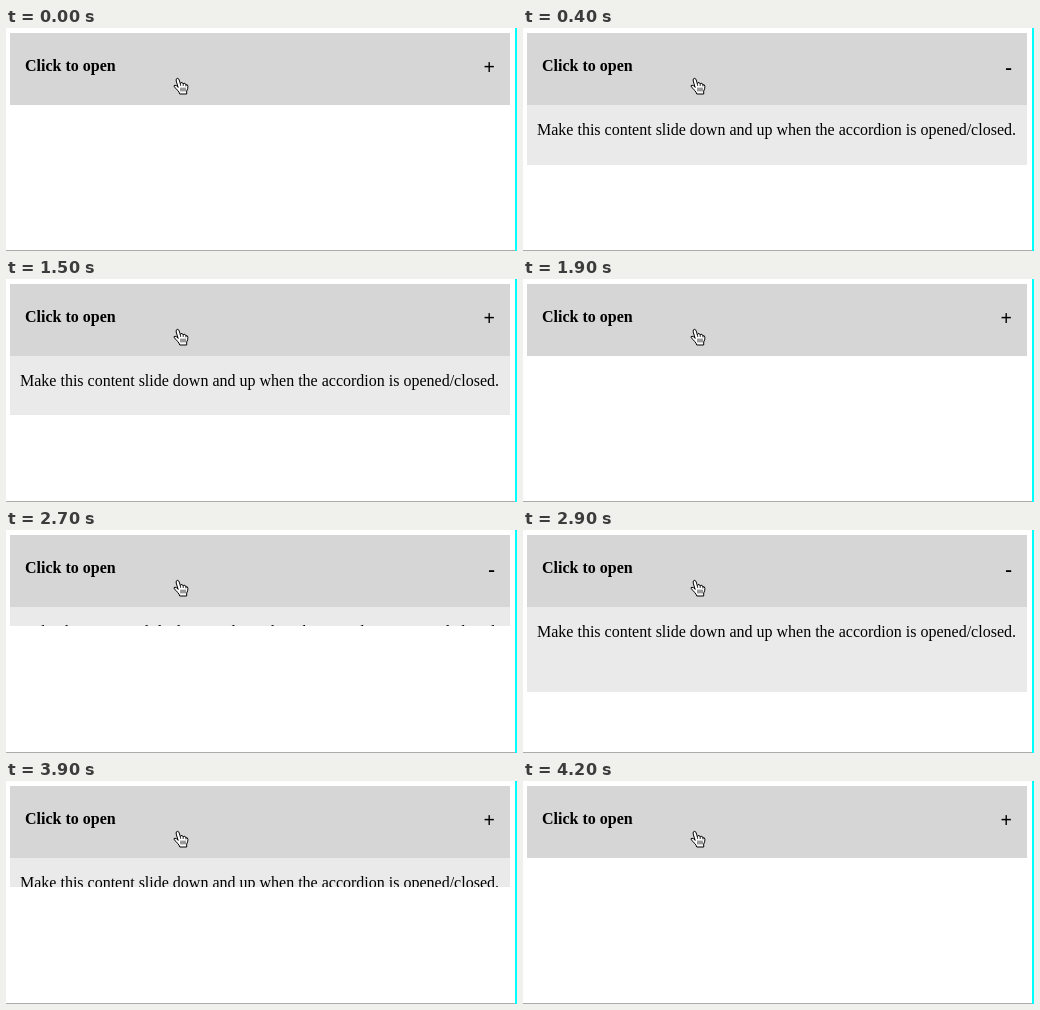
Write an HTML page that moves like this. It is 511 px wide and 223 px high and loops after 4.6 s.

```html
<!DOCTYPE html>
<html lang="en">
<head>
<meta charset="utf-8">
<title>Accordion</title>
<style>
  html, body { margin: 0; width: 100%; height: 100%; overflow: hidden; background: #fff; }
  svg { display: block; width: 511px; height: 223px; }
  text { font: 16px "Liberation Serif", serif; }
  .title { font-weight: bold; }
  .icon { font-weight: bold; font-size: 20px; text-anchor: end; }
</style>
</head>
<body>
<svg viewBox="0 0 511 223">
  <clipPath id="reveal"><rect class="panel" x="4" y="77" width="500" height="0"/></clipPath>
  <rect x="4" y="5" width="500" height="72" fill="#d6d6d6"/>
  <text class="title" x="19" y="43">Click to open</text>
  <text class="icon" id="icon" x="489" y="46">+</text>
  <rect class="panel" x="4" y="77" width="500" height="0" fill="#eaeaea"/>
  <text x="14" y="107" clip-path="url(#reveal)">Make this content slide down and up when the accordion is opened/closed.</text>
  <rect y="222" width="509" height="1" fill="#acacac"/>
  <rect x="509" width="2" height="223" fill="#0ff"/>
  <!-- hand pointer -->
  <g transform="translate(167 49)" stroke="#000" stroke-linejoin="round" stroke-linecap="round">
    <path fill="#fff" d="M5 10 L3.2 4 Q2.8 1.5 4.2 1.3 Q5.6 1.1 6.2 3 L7.3 6.5 Q7.8 5.3 9 5.6 Q10 5.8 10.2 6.9 Q11 5.9 12 6.4 Q12.8 6.8 12.9 7.8 Q14.8 7.2 14.9 9.3 Q15 12 13.7 14 V17 H6.8 Q6.3 15 4.5 13.3 Q3.3 11.5 1.2 9.8 Q.5 8.4 2 8.2 Q3.4 8.2 5 10 Z"/>
    <path fill="none" stroke-width=".8" d="M7.3 6.5 L7.6 8.5 M10.2 6.9 V8.6 M12.9 7.8 V9 M8 11 V14 M10 11 V14 M12 11 V14"/>
  </g>
</svg>
<script>
  const LOOP = 4600, STEP = 100, DURATION = 500, PANEL_HEIGHT = 100;
  const toggles = [
    { start: 225, open: true },
    { start: 1375, open: false },
    { start: 2625, open: true },
    { start: 3690, open: false },
  ];
  const icon = document.getElementById("icon");
  const panels = document.querySelectorAll(".panel");

  // CSS "ease": cubic-bezier(.25, .1, .25, 1)
  function ease(x) {
    const bezier = (u, a, b) => 3 * u * (1 - u) ** 2 * a + 3 * u * u * (1 - u) * b + u ** 3;
    let low = 0, high = 1;
    for (let i = 0; i < 24; i++) {
      const mid = (low + high) / 2;
      if (bezier(mid, 0.25, 0.25) < x) low = mid; else high = mid;
    }
    return bezier(high, 0.1, 1);
  }

  function draw(now) {
    const time = Math.floor(now % LOOP / STEP) * STEP;
    const current = toggles.filter(toggle => toggle.start <= time).pop();
    let shown = 0;
    if (current) {
      const progress = ease(Math.min(1, (time - current.start) / DURATION));
      shown = current.open ? progress : 1 - progress;
    }
    icon.textContent = current && current.open ? "-" : "+";
    panels.forEach(panel => panel.setAttribute("height", Math.round(shown * PANEL_HEIGHT)));
  }

  const begin = performance.now();
  function frame() {
    draw(performance.now() - begin);
    requestAnimationFrame(frame);
  }
  frame();
</script>
</body>
</html>
```
